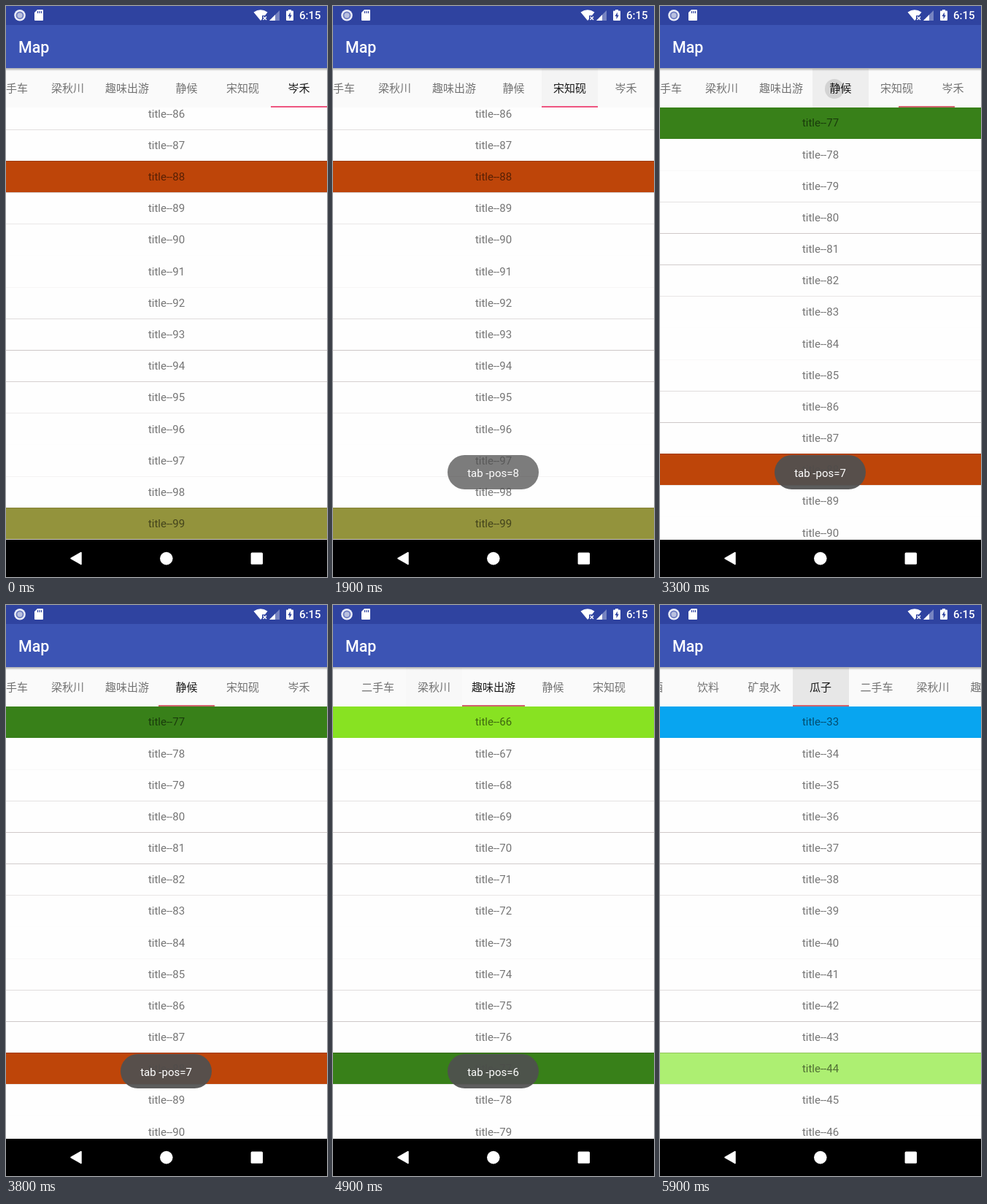
Animation, 440 px wide and 782 px high, one loop 6 s. Source, as an HTML page:

```html
<!DOCTYPE html>
<html lang="zh-CN">
<head>
<meta charset="utf-8">
<title>Map</title>
<style>
  html, body { margin: 0; width: 100%; height: 100%; overflow: hidden; }
  #stage {
    position: relative; width: 440px; height: 782px; overflow: hidden;
    background: #fefefe; font: 15px/45px Roboto, "Noto Sans CJK SC", "Noto Sans CJK", sans-serif;
  }
  #stage div, #stage svg { position: absolute; }
  #list { top: 139px; width: 440px; height: 592px; overflow: hidden; }
  .row { width: 440px; text-align: center; color: rgba(0,0,0,.54); }
  .line { z-index: 1; width: 440px; height: 1px; background: #2a1010; }
  #tabs { top: 86px; width: 440px; height: 53px; overflow: hidden; background: #fafafa; }
  #strip { width: 779px; height: 53px; }
  .tab {
    height: 53px; line-height: 51px; text-align: center; color: rgba(0,0,0,.54);
    font-family: "Noto Sans CJK SC", "Noto Sans CJK", "Noto Sans", sans-serif;
  }
  .tab.on { color: rgba(0,0,0,.9); }
  #press { height: 53px; overflow: hidden; }
  #wave { border-radius: 50%; background: rgba(0,0,0,.115); }
  #mark { top: 51px; height: 2px; }
  #shade { top: 85px; width: 440px; height: 4px; background: linear-gradient(rgba(0,0,0,.32), transparent); }
  #status { width: 440px; height: 26px; background: #2f43a0; }
  #bar { top: 26px; width: 440px; height: 59px; background: #3c54b4; }
  #bar div { left: 17px; color: #fff; font-size: 21.4px; font-weight: 500; line-height: 61px; }
  #clock { left: 402px; color: #fff; font-weight: 500; line-height: 27px; }
  #nav { top: 731px; width: 440px; height: 51px; background: #000; }
  #toast {
    left: 157px; top: 615px; width: 125px; height: 47px; border-radius: 23.5px;
    background: rgba(80,80,80,.93); color: #fff; line-height: 50px; text-align: center;
  }
</style>
</head>
<body>
<div id="stage">
  <div id="list"></div>
  <div id="tabs"><div id="strip"><div id="press"><div id="wave"></div></div></div></div>
  <div id="status">
    <svg width="440" height="26" fill="#fff">
      <circle cx="19" cy="12.800" r="7.800" fill="#eceef8"/>
      <circle cx="19" cy="12.800" r="5.400" fill="#6c7abf"/>
      <circle cx="19" cy="12.800" r="3.600" fill="#b9c0de"/>
      <path d="M43 5h7q1 0 1 1v13q0 1-1 1H40q-1 0-1-1V9z"/>
      <path d="M43.5 7v3M46 7v3M48.5 7v3" stroke="#2f43a0" stroke-width="1.2"/>
      <path d="M339.5 8.5Q349 2 358.500 8.500L355 13h-4v5l-2 2z"/>
      <path d="M352.500 14.500l4.500 4.500m0-4.500l-4.500 4.500" stroke="#fff" stroke-width="1.5"/>
      <path d="M375 6v14h-14z" opacity=".35"/>
      <path d="M369 12v8h-8z"/>
      <path d="M387 5h4v1.500h2q1 0 1 1V19q0 1-1 1h-8q-1 0-1-1V7.500q0-1 1-1h2z"/>
      <path d="M389.800 8.500l-3.300 5.500h2v4l3.300-5.500h-2z" fill="#2f43a0"/>
    </svg>
    <div id="clock">6:15</div>
  </div>
  <div id="bar"><div>Map</div></div>
  <div id="shade"></div>
  <div id="nav">
    <svg width="440" height="51" fill="#fff">
      <path d="M89 25.500l14-8v16z" stroke="#fff" stroke-width="1.500" stroke-linejoin="round"/>
      <circle cx="219.800" cy="25.600" r="8.800"/>
      <rect x="335.600" y="17.400" width="16.400" height="16.400" rx="1.500"/>
    </svg>
  </div>
  <div id="toast"></div>
</div>
<script>
  const LOOP = 6000, ROW = 43.17, VIEW = 440;
  const names = ['啤酒', '饮料', '矿泉水', '瓜子', '二手车', '梁秋川', '趣味出游', '静候', '宋知砚', '岑禾'];
  const fills = { 33: '#08a5f0', 44: '#adef72', 55: '#40d800', 66: '#88e222', 77: '#388019', 88: '#be4509', 99: '#93933c' };

  // up: selection starts, down: ripple starts, x: ripple centre within the tab
  const moves = [
    { tab: 9, up: -1000 },
    { tab: 8, up: 1530, down: 1478, x: 38 },
    { tab: 9, up: 2350 },
    { tab: 7, up: 3226, down: 3245, x: 30 },
    { tab: 6, up: 4126, down: 4104, x: 57 },
    { tab: 5, up: 4954, down: 4894, x: 38 },
    { tab: 3, up: 5590, down: 5530, x: 38 }
  ];

  const $ = id => document.getElementById(id);
  const add = (parent, cls, text = '') => {
    const el = document.createElement('div');
    el.className = cls;
    el.textContent = text;
    parent.append(el);
    return el;
  };
  const clamp = (v, lo = 0, hi = 1) => Math.min(hi, Math.max(lo, v));
  const mix = (a, b, p) => a + (b - a) * p;

  // cubic-bezier(.4, 0, .2, 1)
  function ease(x) {
    if (x <= 0 || x >= 1) return clamp(x);
    let lo = 0, hi = 1, u;
    for (let i = 0; i < 20; i++) {
      u = (lo + hi) / 2;
      const at = 1.2 * u * (1 - u) ** 2 + 0.6 * u * u * (1 - u) + u ** 3;
      if (at < x) lo = u; else hi = u;
    }
    return 3 * u * u - 2 * u ** 3;
  }

  let total = 0;
  const tabs = names.map(name => {
    const el = add($('strip'), 'tab', name);
    const tab = { el, left: total, width: name.length > 3 ? 86 : 77 };
    el.style.left = tab.left + 'px';
    el.style.width = tab.width + 'px';
    total += tab.width;
    return tab;
  });
  const mark = add($('strip'), '');
  mark.id = 'mark';
  const scrollFor = tab => clamp(tab.left + tab.width / 2 - VIEW / 2, 0, total - VIEW);

  const rows = Array.from({ length: 15 }, () => ({ el: add($('list'), 'row'), line: add($('list'), 'line') }));
  let shown = -1;

  function showList(tab) {
    if (tab === shown) return;
    shown = tab;
    const atEnd = tab > 7;
    const first = atEnd ? 86 : tab * 11;
    const top = atEnd ? 126.3 : 138.95;
    rows.forEach(({ el, line }, i) => {
      const n = first + i, y = top + i * ROW, end = y + ROW;
      el.textContent = n < 100 ? 'title--' + n : '';
      el.style.top = Math.floor(y) - 139 + 'px';
      el.style.height = Math.floor(end) - Math.floor(y) + 'px';
      el.style.background = fills[n] || 'none';
      // a divider thinner than a pixel fades with its subpixel position
      const edge = end - 0.2;
      line.style.top = Math.floor(edge) - 139 + 'px';
      line.style.opacity = 0.23 * Math.sin(Math.PI * (edge % 1)) ** 2;
    });
  }

  function showPress(t) {
    const hit = moves.filter(m => m.down <= t).pop();
    const age = hit ? t - hit.down : 999;
    const press = $('press').style, wave = $('wave').style;
    press.opacity = clamp(1 - (age - 250) / 200);
    if (!hit) return;
    const tab = tabs[hit.tab], r = Math.min(120, 0.0043 * age * age);
    press.left = tab.left + 'px';
    press.width = tab.width + 'px';
    press.background = `rgba(0,0,0,${Math.min(0.09, age * 0.00085)})`;
    wave.left = hit.x - r + 'px';
    wave.top = 27.5 - r + 'px';
    wave.width = wave.height = 2 * r + 'px';
  }

  function draw(t) {
    const i = moves.findLastIndex(m => m.up <= t);
    const now = moves[i], to = tabs[now.tab], from = tabs[moves[Math.max(0, i - 1)].tab];
    const p = ease((t - now.up) / 300);

    $('strip').style.left = -mix(scrollFor(from), scrollFor(to), p) + 'px';
    mark.style.left = mix(from.left, to.left, p) + 'px';
    mark.style.width = mix(from.width, to.width, p) + 'px';
    mark.style.background = i < 3 ? '#ee5580' : '#cf626c';
    tabs.forEach(tab => tab.el.classList.toggle('on', tab === to));

    showPress(t);
    showList(now.tab);

    const told = moves.filter(m => m.down && m.up <= t && m.up < 4900).pop();
    $('toast').textContent = told ? 'tab -pos=' + told.tab : '';
    $('toast').style.opacity = clamp((t - 1660) / 300) * clamp((5050 - t) / 150);
  }

  const start = performance.now();
  function tick() {
    draw((performance.now() - start) % LOOP);
    requestAnimationFrame(tick);
  }
  tick();
</script>
</body>
</html>
```
